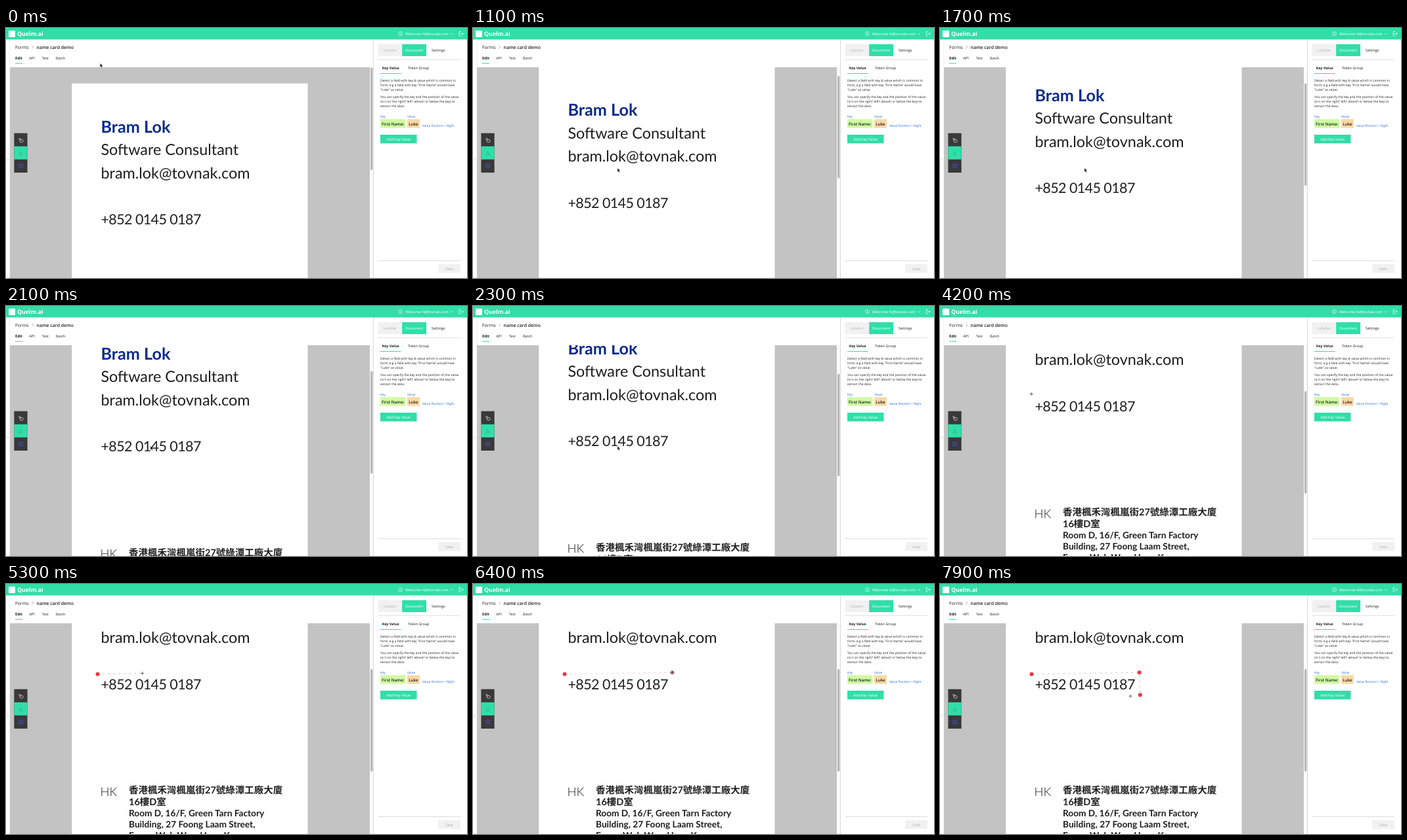
These frames come from a looping animation (702 px wide and 382 px high, 8000 ms). An HTML page:

```html
<!DOCTYPE html>
<html lang="en">
<head>
<meta charset="utf-8">
<title>Name card form editor</title>
<style>
  html, body { margin: 0; width: 100%; height: 100%; overflow: hidden; background: #fff; }
  svg { display: block; width: 100%; height: 100%; }
  text { font-family: "Open Sans", "Noto Sans", sans-serif; text-rendering: geometricPrecision; white-space: pre; }
  .card text { font-family: Lato, "Noto Sans CJK TC", "Noto Sans CJK", "Noto Sans CJK JP", sans-serif; }
</style>
</head>
<body>
<svg id="stage" viewBox="0 0 702 382"></svg>
<script>
const LOOP = 8000, STEP = 100;
const GREEN = '#31dea8', INK = '#1f1f1f', BLUE = '#2468d8', RED = '#ec3544', LINE = '#b8b1b4';

const rect = (x, y, w, h, fill, more = '') =>
  `<rect x="${x}" y="${y}" width="${w}" height="${h}" fill="${fill}" ${more}/>`;
const text = (x, y, size, str, fill = INK, more = '') =>
  `<text x="${x}" y="${y}" font-size="${size}" fill="${fill}" ${more}>${str}</text>`;
const stroke = (d, color, width = 0.7, more = '') =>
  `<path d="${d}" fill="none" stroke="${color}" stroke-width="${width}" ${more}/>`;
const MID = 'text-anchor="middle" ', MEDIUM = 'font-weight="500" ',
  SEMI = 'font-weight="600" ', BOLD = 'font-weight="700" ';

const header = rect(0, 0, 702, 17.5, GREEN)
  + rect(4, 4, 10, 10, '#fff', 'rx="1"')
  + text(17, 12.2, 8.8, 'Quelm.ai', '#fff', BOLD)
  + '<circle cx="600.5" cy="8.7" r="3" fill="none" stroke="#fff" stroke-width=".6"/>'
  + stroke('M600.5 8.2v2.2M600.5 6.8v.7', '#fff')
  + text(608, 11, 5.6, 'Welcome hi@tovnak.com', '#fff', MEDIUM)
  + stroke('M677 7.8l2 2 2-2', '#fff', 0.6)
  + stroke('M693 5.5h-2.8v6.4h2.8M692 8.7h4.2M694.7 7l1.7 1.7-1.7 1.7', '#fff');

const crumbs = text(14, 31.7, 7, 'Forms')
  + stroke('M39.5 26.7l2.2 2.3-2.2 2.3', '#888', 0.6)
  + text(46.5, 31.7, 6.95, 'name card demo', INK, SEMI)
  + text(14, 48, 5.7, 'Edit', INK, BOLD)
  + text(35.3, 48, 5.6, 'API', INK, MEDIUM)
  + text(54.8, 48, 5.4, 'Test', INK, MEDIUM)
  + text(76, 48, 5.4, 'Batch', INK, MEDIUM)
  + rect(14, 53.6, 11, 1.1, GREEN);

const card = '<g class="card" id="card">'
  + rect(100.3, 84.7, 359.2, 900, '#fff')
  + text(144.5, 159.5, 25.2, 'Bram Lok', '#0b2b8c', BOLD)
  + text(144.5, 194.3, 23.4, 'Software Consultant')
  + text(144.5, 229.6, 23.4, 'bram.lok@tovnak.com')
  + text(144.5, 300, 21.5, '+852 0145 0187', INK, 'letter-spacing="-.6"')
  + text(143.5, 462.8, 18.5, 'HK', INK, 'font-weight="300"')
  + text(187, 459.5, 14.5, '香港楓禾灣楓嵐街27號綠潭工廠大廈', INK, BOLD)
  + text(187, 477.5, 14.5, '16樓D室', INK, BOLD)
  + ['Room D, 16/F, Green Tarn Factory', 'Building, 27 Foong Laam Street,', 'Foong Woh Wan, Hong Kong']
      .map((s, i) => text(187, 494.6 + i * 16.6, 13.7, s, INK, BOLD)).join('')
  + '</g>';

const canvas = '<clipPath id="view"><rect x="6" y="60" width="548" height="322"/></clipPath>'
  + rect(6, 60, 548, 322, '#c3c3c3')
  + `<g clip-path="url(#view)">${card}</g>`
  + rect(554, 60, 5, 322, '#fafafa')
  + rect(555, 60.5, 3.4, 156.5, '#b8b8b8', 'rx="1.7" id="thumb"')
  + stroke('M559.5 17.5V382', '#cfcfcf', 0.8)
  + stroke('M5.7 17.5V382', '#e6e6e6', 0.6)
  + stroke('M1.9 199l1.6 1.7-1.6 1.7', '#999', 0.5);

const tools = rect(12.4, 160.7, 20.2, 60.3, '#393939')
  + rect(12.4, 180.8, 20.2, 20, GREEN)
  + stroke('M19.3 168.2l2 4M21.6 168l.8 4.5M22.4 170.5h2.2l1.4 1v2l-1 1.2h-2.6l-2-2.2', '#eee')
  + stroke('M22.5 187.5v2l-2.8 4.2h5.6l-2.8-4.2', '#26a17f', 0.6)
  + stroke('M19.5 207.8h6v6h-6zM19.5 209.8h6M21 211.8h3M24 212.8h1.5', '#4553c8');

const lines = (y, list) =>
  list.map((s, i) => text(570, y + i * 6.7, 4.93, s, INK, MEDIUM)).join('');
const panel = rect(566.5, 24.7, 36.7, 18.3, '#f1f1f1') + rect(603.2, 24.7, 36.9, 18.3, GREEN)
  + text(584.8, 36, 5.55, 'Labeller', '#b9b9b9', MID)
  + text(621.6, 36, 5.55, 'Document', '#fff', MID + MEDIUM)
  + text(658.4, 36, 5.55, 'Settings', INK, MID + MEDIUM)
  + rect(566.5, 47.8, 125.5, 0.8, '#d4d4d4')
  + text(585.6, 63.2, 5.35, 'Key Value', INK, MID + BOLD)
  + text(628.2, 63.2, 5.45, 'Token Group', INK, MID + MEDIUM)
  + rect(570, 69, 31.5, 1, GREEN)
  + lines(82.2, ['Detect a field with key &amp; value which is common in',
      'form, e.g a field with key "First Name" would have', '"Luke" as value.'])
  + lines(107.2, ['You can specify the key and the position of the value',
      '(is it on the right? left? above? or below the key) to', 'extract the data.'])
  + text(570, 136.6, 4.8, 'Key', BLUE, MEDIUM) + text(611, 136.6, 4.8, 'Value', BLUE, MEDIUM)
  + rect(570, 139.3, 38.5, 13.4, '#d0fba2') + rect(611, 139.3, 19, 13.4, '#fbd8a4')
  + text(589.3, 148.5, 6.25, 'First Name:', INK, MID + SEMI)
  + text(620.5, 148.5, 6.25, 'Luke', INK, MID + SEMI)
  + text(633.8, 151, 4.85, 'Value Position = Right', BLUE, MEDIUM)
  + rect(570, 163, 55.5, 13.3, GREEN)
  + text(597.7, 171.6, 5.6, 'Add Key Value', '#fff', MID + MEDIUM)
  + rect(566.5, 355, 125.5, 0.8, '#d4d4d4')
  + rect(658.3, 360.7, 33.7, 13.6, '#f1f1f1')
  + text(675.2, 369.6, 5.6, 'Save', '#acacac', MID);

// Corners of the drawn outline with the time each is placed.
const dots = [
  { x: 139.5, y: 137.8, t: 4600 },
  { x: 303.5, y: 135.3, t: 6200 },
  { x: 304.8, y: 169.5, t: 7500 }
];
const overlay = stroke('', LINE, 0.8, 'stroke-dasharray="2.8 5.2" id="edge"')
  + dots.map(d => `<circle class="dot" cx="${d.x}" cy="${d.y}" fill="${RED}"/>`).join('')
  + '<path id="arrow" d="M0 0v6l1.4-1.3 1 2.3 1-.5-1-2.2h1.9z" fill="#111" stroke="#fff" stroke-width=".3"/>'
  + stroke('M-2.7 0h5.4M0-2.7v5.4', '#3b3b4c', 0.75, 'id="cross"');

const $ = id => document.getElementById(id);
$('stage').innerHTML = header + crumbs + canvas + tools + panel + overlay;
const circles = [...document.querySelectorAll('.dot')];

const scrollKeys = [[0, 0], [800, 0], [1200, 34], [1400, 34], [1700, 48], [2100, 78],
  [2300, 86], [2400, 86], [2600, 138], [2700, 139.2]];
const pointerKeys = [[0, 143.3, 54], [500, 220, 214], [2800, 220, 214], [3200, 25, 190],
  [3600, 90.5, 280.5], [3800, 90.5, 280.5], [4200, 139.2, 134.5], [4400, 139.5, 137.8],
  [4900, 139.5, 137.8], [5800, 303, 134.6], [5900, 303.5, 135.3], [6600, 303.5, 135.3],
  [7300, 304.8, 169.5], [7800, 304.8, 169.5], [7900, 290, 171.3]];

const smooth = u => u * u * (3 - 2 * u);
function sample(keys, t, ease = u => u) {
  const i = keys.findIndex(k => k[0] > t);
  if (i < 0) return keys[keys.length - 1].slice(1);
  const a = keys[i - 1], b = keys[i];
  const u = ease((t - a[0]) / (b[0] - a[0]));
  return a.slice(1).map((v, n) => v + (b[n + 1] - v) * u);
}

function draw(t) {
  const [scroll] = sample(scrollKeys, t);
  const [x, y] = sample(pointerKeys, t, smooth);
  $('card').setAttribute('transform', `translate(0 ${-scroll})`);
  $('thumb').setAttribute('transform', `translate(0 ${scroll / 2})`);

  const crossed = t >= 3300;
  $('arrow').setAttribute('visibility', crossed ? 'hidden' : 'visible');
  $('cross').setAttribute('visibility', crossed ? 'visible' : 'hidden');
  $(crossed ? 'cross' : 'arrow').setAttribute('transform', `translate(${x} ${y})`);

  // A fresh dot grows in and stays pale while the pointer rests on it.
  circles.forEach((c, i) => {
    const d = dots[i], age = t - d.t;
    const hovered = Math.hypot(x - d.x, y - d.y) < 3;
    c.setAttribute('r', age < 0 ? 0 : Math.min(3, 2.2 + age / 250));
    c.setAttribute('fill-opacity', hovered ? 0.7 : 1);
  });

  const points = dots.filter(d => t >= d.t).map(d => `${d.x} ${d.y}`);
  if (points.length && points.length < dots.length) points.push(`${x} ${y}`);
  $('edge').setAttribute('d', points.length ? 'M' + points.join('L') : '');
  $('edge').setAttribute('stroke', t >= 6200 && t < 6700 ? '#efb3b9' : LINE);
}

const start = performance.now();
function tick() {
  const t = (performance.now() - start) % LOOP;
  draw(Math.floor(t / STEP) * STEP);
  requestAnimationFrame(tick);
}
tick();
</script>
</body>
</html>
```
